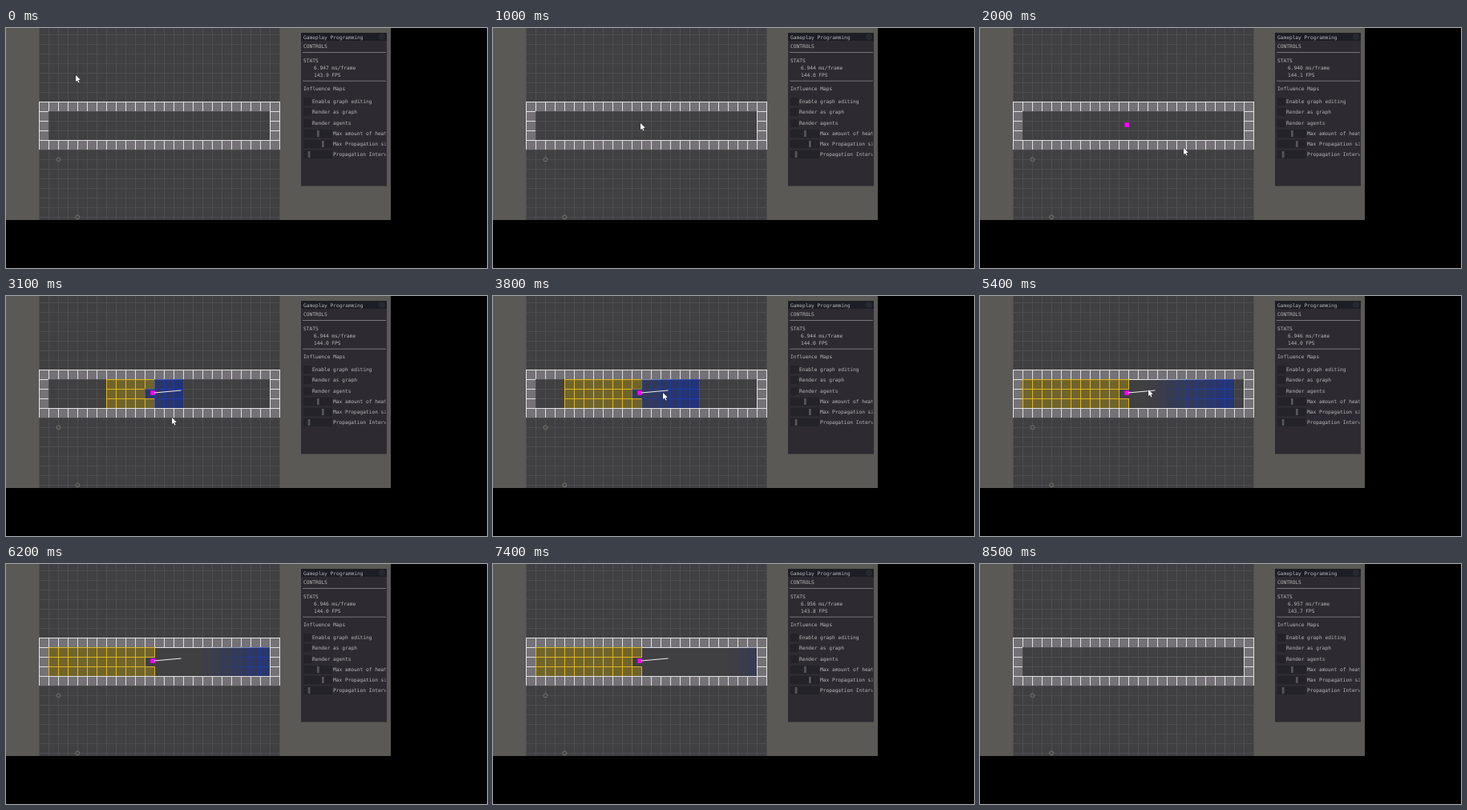
Write an HTML page with a canvas that moves like this. It is 600 by 300 pixels and loops after 8600 ms.

```html
<!DOCTYPE html>
<html lang="en">
<head>
<meta charset="utf-8">
<title>Influence map</title>
<style>
html, body { margin: 0; width: 100%; height: 100%; overflow: hidden; background: #000; }
canvas { display: block; }
</style>
</head>
<body>
<canvas id="stage" width="600" height="300"></canvas>
<script>
const ctx = document.getElementById('stage').getContext('2d');
const LOOP = 8600, TICK = 100;
const COLS = 25, LEFT = 41, TOP = 92, CELL = 12;
const FIRST_ROW = -8, LAST_ROW = 12, WALL_BOTTOM = 4, SOURCE_COL = 11;
const PLACED = 1400, START = 2200, CLEARED = 7900, FADE = 2700;

// [time, x, y]
const cursorPath = [
  [0, 87, 59], [300, 90, 62], [900, 184, 118], [1400, 184, 121], [1800, 249, 153],
  [2000, 254, 150], [2300, 232, 160], [2700, 207, 172], [2850, 204, 171],
  [3100, 207, 152], [3600, 212, 122], [4600, 210, 117], [5600, 210, 117],
  [5900, 72, 32]
];
// [time, ms per frame]
const frameTimes = [
  [0, 6.947], [2000, 6.940], [3100, 6.944], [4600, 6.945],
  [6200, 6.946], [7400, 6.956], [8500, 6.957]
];

const hitTime = step => Math.max(START, 4560 - 282 * (10 - step));

function sample(keys, t) {
  let i = 0;
  while (i < keys.length - 2 && t > keys[i + 1][0]) i++;
  const a = keys[i], b = keys[i + 1];
  const u = Math.min(1, Math.max(0, (t - a[0]) / (b[0] - a[0])));
  return a.slice(1).map((v, n) => v + (b[n + 1] - v) * u);
}

function rect(x, y, w, h, color) {
  ctx.fillStyle = color;
  ctx.fillRect(x, y, w, h);
}

function isWall(i, j) {
  if (j < 0 || j > WALL_BOTTOM) return false;
  return j === 0 || j === WALL_BOTTOM || i === 0 || i === COLS - 1;
}

// Returns [fill, outline] of one cell.
function cellStyle(i, j, t) {
  if (isWall(i, j)) return ['#747276', '#e0e0e0'];
  const inside = j > 0 && j < WALL_BOTTOM;
  const isSource = i === SOURCE_COL && j === 2;
  const blue = isSource || i > SOURCE_COL;
  const step = blue ? i - SOURCE_COL + (isSource ? 0 : 1) - 1 : SOURCE_COL - i;
  const age = t - hitTime(Math.max(0, blue ? step + 1 - (isSource ? 0 : 1) + 1 : step));
  if (!inside || age < 0 || t >= CLEARED) return [null, '#4d4c4e'];
  if (!blue) return ['#71642a', '#dcb626'];
  const power = Math.max(0, 1 - age / FADE);
  const edge = Math.max(0, power - 0.2);
  return [`rgba(28,50,132,${0.85 * power})`, `rgba(30,62,210,${0.8 * edge})`];
}

// Later cells paint over the edges they share with earlier ones.
function drawCells(t) {
  rect(LEFT, 0, COLS * CELL + 1, 240, '#403f41');
  for (let j = FIRST_ROW; j <= LAST_ROW; j++) {
    for (let i = 0; i < COLS; i++) {
      const x = LEFT + i * CELL, y = TOP + j * CELL;
      const [fill, line] = cellStyle(i, j, t);
      if (fill) rect(x, y, CELL, CELL, fill);
      rect(x, y, CELL + 1, 1, line);
      rect(x, y + CELL, CELL + 1, 1, line);
      rect(x, y + 1, 1, CELL - 1, line);
      rect(x + CELL, y + 1, 1, CELL - 1, line);
    }
  }
}

function drawNodes() {
  ctx.strokeStyle = '#75746a';
  ctx.lineWidth = 1;
  for (const [x, y] of [[65.5, 164.3], [89.3, 236.3]]) {
    ctx.beginPath();
    ctx.arc(x, y, 2.5, 0, 7);
    ctx.stroke();
  }
}

function drawAgent(t) {
  rect(180.4, 118.2, 5.6, 5.6, '#ff00ff');
  if (t < START) return;
  ctx.strokeStyle = '#f0f0f0';
  ctx.lineWidth = 1;
  ctx.beginPath();
  ctx.moveTo(185, 121);
  ctx.lineTo(218.5, 118);
  ctx.stroke();
}

function drawCursor(t) {
  const [x, y] = sample(cursorPath, t).map(Math.round);
  const arrow = [[0, 0], [0, 8], [2, 6.4], [3.3, 9.5], [4.6, 8.9], [3.3, 5.9], [5.8, 5.8]];
  ctx.beginPath();
  for (const [dx, dy] of arrow) ctx.lineTo(x + dx, y + dy);
  ctx.closePath();
  ctx.strokeStyle = 'rgba(20,20,20,0.7)';
  ctx.lineWidth = 1;
  ctx.stroke();
  ctx.fillStyle = '#fff';
  ctx.fill();
}

function label(str, x, y) {
  ctx.fillStyle = '#b8b8ba';
  ctx.fillText(str, x, y + 2.2);
}

function drawPanel(t) {
  rect(368, 6, 107, 191.5, '#2d2b31');
  rect(368, 6, 107, 10, '#1d1e25');
  ctx.fillStyle = '#272930';
  ctx.beginPath();
  ctx.arc(469, 11, 4, 0, 7);
  ctx.fill();
  for (const y of [30, 65.7]) rect(370, y, 104, 1, '#77767a');

  ctx.save();
  ctx.beginPath();
  ctx.rect(368, 6, 105.5, 191);
  ctx.clip();
  ctx.font = '6.2px "DejaVu Sans Mono", monospace';
  label('Gameplay Programming', 371, 11.5);
  label('CONTROLS', 371, 23.2);
  label('STATS', 371, 40.5);
  const [ms] = sample(frameTimes, t);
  label(ms.toFixed(3) + ' ms/frame', 384, 49.5);
  label((1000 / ms).toFixed(1) + ' FPS', 384, 58.5);
  label('Influence Maps', 371, 76);

  ['Enable graph editing', 'Render as graph', 'Render agents'].forEach((str, n) => {
    const y = 91.7 + n * 13.4;
    rect(371, Math.round(y - 5), 10, 10, '#242329');
    label(str, 382, y);
  });
  [['Max amount of heat', 388], ['Max Propagation size', 394], ['Propagation Interval', 376.7]]
    .forEach(([str, grab], n) => {
      const y = 131.8 + n * 13.2;
      rect(371, Math.round(y - 5), 36, 10, '#242329');
      rect(grab, Math.round(y - 4), 2.7, 8, '#57565a');
      label(str, 408, y);
    });
  ctx.restore();
}

function draw(t) {
  rect(0, 0, 600, 300, '#000');
  rect(0, 0, 480, 240, '#5a5955');
  drawCells(t);
  drawNodes();
  if (t >= PLACED && t < CLEARED) drawAgent(t);
  drawPanel(t);
  if (t <= 5900) drawCursor(t);
  rect(0, 240, 600, 60, '#000');
}

const begin = performance.now();
function loop(now) {
  const t = Math.max(0, now - begin) % LOOP;
  draw(Math.floor(t / TICK) * TICK);
  requestAnimationFrame(loop);
}
draw(0);
requestAnimationFrame(loop);
</script>
</body>
</html>
```
